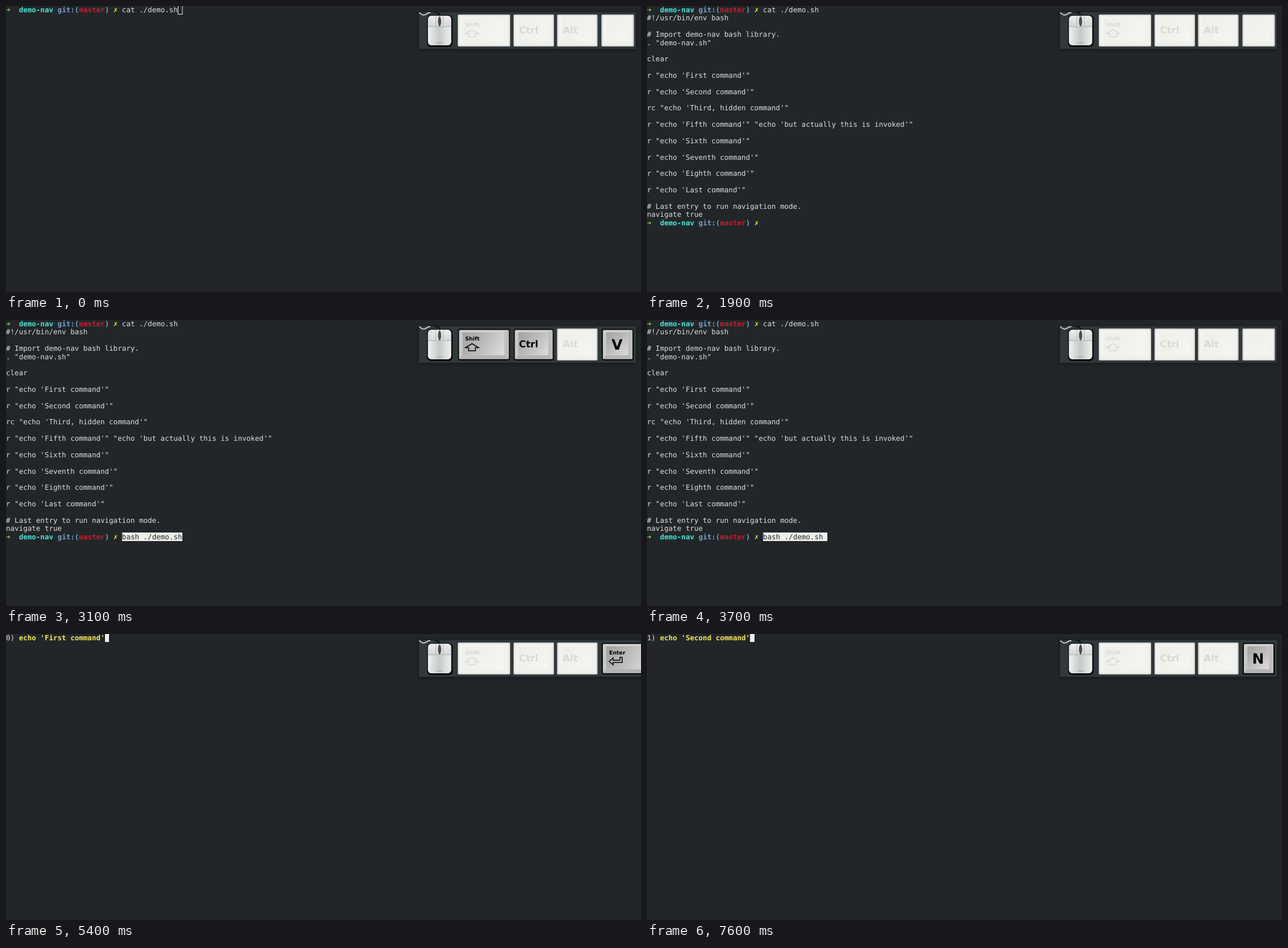
An HTML page with a canvas that plays this animation: 1116x502 px, repeating every 8000 ms.

```html
<!DOCTYPE html>
<html lang="en">
<head>
<meta charset="utf-8">
<title>Terminal demo</title>
<style>
  html, body { margin: 0; width: 100%; height: 100%; overflow: hidden; background: #222629; }
  canvas { display: block; }
</style>
</head>
<body>
<canvas id="stage" width="1116" height="502"></canvas>
<script>
const ctx = document.getElementById("stage").getContext("2d");
const LOOP = 8000, COL = 7.55, ROW = 14.365;
const MONO = '12.54px "DejaVu Sans Mono", "DejaVu Sans", monospace';
const SANS = '"DejaVu Sans", sans-serif';
const BG = "#222629", FG = "#dfe0dc", WHITE = "#eeeeec", YELLOW = "#f2e75c";

const SCRIPT = `#!/usr/bin/env bash

# Import demo-nav bash library.
. "demo-nav.sh"

clear

r "echo 'First command'"

r "echo 'Second command'"

rc "echo 'Third, hidden command'"

r "echo 'Fifth command'" "echo 'but actually this is invoked'"

r "echo 'Sixth command'"

r "echo 'Seventh command'"

r "echo 'Eighth command'"

r "echo 'Last command'"

# Last entry to run navigation mode.
navigate true`.split("\n");

// Each step overrides parts of the state before it.
const STEPS = [
  [0, { view: "typed", cursor: "hollow", click: false, mods: false, key: "" }],
  [400, { cursor: "block", click: true }],
  [600, { click: false }],
  [1000, { cursor: "" }],
  [1300, { view: "listing", cursor: "block", key: "Enter" }],
  [1900, { cursor: "", key: "" }],
  [2500, { cursor: "block", mods: true }],
  [3100, { view: "pasted", cursor: "", key: "V" }],
  [3600, { mods: false, key: "" }],
  [3700, { cursor: "block" }],
  [4300, { cursor: "" }],
  [4900, { cursor: "block" }],
  [5400, { view: "first", key: "Enter" }],
  [6000, { cursor: "", key: "" }],
  [6600, { cursor: "block" }],
  [7100, { cursor: "" }],
  [7600, { view: "second", cursor: "block", key: "N" }]
];

function stateAt(time) {
  return Object.assign({}, ...STEPS.filter(([start]) => start <= time).map(([, change]) => change));
}

function write(text, col, row, color = FG, bold = false) {
  ctx.font = (bold ? "bold " : "") + MONO;
  ctx.fillStyle = color;
  ctx.fillText(text, col * COL, 11.1 + row * ROW);
}

function cells(col, row, count) {
  const left = Math.round(col * COL), top = Math.round(row * ROW);
  ctx.fillStyle = WHITE;
  ctx.fillRect(left, top, Math.round((col + count) * COL) - left, Math.round((row + 1) * ROW) - top);
}

function prompt(row) {
  write("➜", 0, row, "#8ae234", true);
  write("demo-nav", 3, row, "#48e4d6", true);
  write("git:(", 12, row, "#729fcf", true);
  write("master", 17, row, "#c81c2c", true);
  write(")", 23, row, "#729fcf", true);
  write("✗", 25, row, "#f4e840", true);
}

function terminal({ view, cursor }) {
  let col = 40, row = 0;
  if (view === "first" || view === "second") {
    const command = view === "first" ? "echo 'First command'" : "echo 'Second command'";
    write(view === "first" ? "0)" : "1)", 0, 0);
    write(command, 3, 0, YELLOW, true);
    col = 3 + command.length;
  } else {
    prompt(0);
    write("cat ./demo.sh", 27, 0);
    if (view !== "typed") {
      SCRIPT.forEach((line, i) => write(line, 0, i + 1));
      row = SCRIPT.length + 1;
      col = 27;
      prompt(row);
    }
    if (view === "pasted") {
      const command = "bash ./demo.sh";
      cells(col, row, command.length);
      write(command, col, row, BG);
      col += command.length;
    }
  }
  if (cursor === "block") cells(col, row, 1);
  if (cursor === "hollow") {
    ctx.strokeStyle = WHITE;
    ctx.lineWidth = 1;
    ctx.strokeRect(302.5, -0.5, 7.5, 15);
  }
}

function gradient(x0, y0, x1, y1, ...colors) {
  const fill = ctx.createLinearGradient(x0, y0, x1, y1);
  colors.forEach((color, i) => fill.addColorStop(i / (colors.length - 1), color));
  return fill;
}

function rounded(x, y, w, h, r, fill) {
  ctx.beginPath();
  ctx.roundRect(x, y, w, h, r);
  ctx.fillStyle = fill;
  ctx.fill();
}

function polygon(points, fill, stroke) {
  ctx.beginPath();
  points.forEach(([x, y]) => ctx.lineTo(x, y));
  ctx.closePath();
  if (fill) { ctx.fillStyle = fill; ctx.fill(); }
  if (stroke) { ctx.strokeStyle = stroke; ctx.lineWidth = 1.5; ctx.stroke(); }
}

function label(text, x, y, size, align = "left") {
  ctx.font = `bold ${size}px ${SANS}`;
  ctx.textAlign = align;
  ctx.fillStyle = "#000";
  ctx.fillText(text, x, y);
  ctx.textAlign = "left";
}

function keycap(x, w, pressed, drawLabel) {
  const l = x + 2.5, r = x + w - 2.5, t = 17.5, b = 68.5;
  const fl = l + 6, fr = r - 8, ft = t + 4, fb = b - 7;
  rounded(x + 0.5, 15.5, w - 1, 55.5, 3, "#080808");
  rounded(l, t, r - l, b - t, 2, "#d2d2d2");
  polygon([[l, t], [fl, ft], [fl, fb], [l, b]], "#c9c9c9");
  polygon([[r, t], [fr, ft], [fr, fb], [r, b]], "#bebebe");
  polygon([[l, b], [fl, fb], [fr, fb], [r, b]], "#b4b4b4");
  rounded(fl, ft, fr - fl, fb - ft, 1, gradient(fl, ft, fr, fb, "#a2a2a2", "#bcbcbc", "#dedede"));
  drawLabel();
  if (!pressed) rounded(x, 15, w, 56, 2, "rgba(250,250,245,0.87)");
}

function shiftLabel() {
  label("Shift", 807, 35.5, 9.4);
  polygon([[819, 41.5], [830.5, 48.5], [825, 48.5], [825, 54], [813, 54], [813, 48.5], [807.5, 48.5]], null, "#000");
}

function enterLabel() {
  label("Enter", 1060, 35.5, 9.4);
  polygon([[1060, 48], [1067, 42], [1067, 46], [1079, 46], [1079, 41], [1083, 41], [1083, 50], [1067, 50], [1067, 54]], null, "#000");
}

function cord(color, width, start, ...curves) {
  ctx.beginPath();
  ctx.moveTo(...start);
  curves.forEach(curve => ctx.bezierCurveTo(...curve));
  ctx.strokeStyle = color;
  ctx.lineWidth = width;
  ctx.stroke();
}

function mouse(click) {
  cord("#0c0d0e", 2, [752, 11], [758, 11, 762, 12, 762, 17]);
  cord("#d4d6d6", 1.8, [726, 11], [731, 17, 735, 17, 739, 14], [741, 12, 743, 11.5, 746, 11.5]);
  rounded(740, 16, 45, 56, 7, "#070809");
  rounded(741.5, 17, 41, 52, 6, gradient(741, 0, 783, 0, "#f3f3f3", "#d9dbdb", "#c5c9ca", "#dcdede", "#eeeeee"));
  rounded(742, 17.5, 40, 18.5, [6, 6, 0, 0], gradient(0, 17, 0, 36, "#eeeeee", "#d3d5d6"));
  if (click) rounded(742, 17.5, 20, 18.5, [6, 0, 0, 0], gradient(0, 17, 0, 36, "#777777", "#333333"));
  ctx.fillStyle = "#aeb2b3";
  ctx.fillRect(742, 36, 40, 1);
  ctx.fillRect(755, 18, 1, 18);
  ctx.fillRect(768, 18, 1, 18);
  ctx.fillRect(756.5, 64, 11, 2);
  ctx.beginPath();
  ctx.ellipse(762, 27, 2.6, 9, 0, 0, Math.PI * 2);
  ctx.fillStyle = gradient(759, 0, 765, 0, "#202426", "#555b5e", "#202426");
  ctx.fill();
}

function overlay({ click, mods, key }) {
  const wide = key === "Enter";
  ctx.save();
  ctx.shadowColor = "rgba(0,0,0,0.4)";
  ctx.shadowBlur = 8;
  ctx.shadowOffsetY = 2;
  ctx.fillStyle = "#30383b";
  ctx.fillRect(726, 11, wide ? 417 : 381, 64);
  ctx.restore();

  ctx.save();
  ctx.beginPath();
  ctx.rect(726, 11, 390, 64);
  ctx.clip();
  mouse(click);
  keycap(794, 92, mods, shiftLabel);
  keycap(892, 71, mods, () => label("Ctrl", 901.5, 48, 16.6));
  keycap(968.5, 71, false, () => label("Alt", 978.5, 48, 16.6));
  keycap(1046.5, wide ? 92 : 57, key !== "", wide ? enterLabel : () => label(key, 1074, 52, 25, "center"));
  ctx.restore();
}

function frame() {
  const state = stateAt(performance.now() % LOOP);
  ctx.textRendering = "geometricPrecision";
  ctx.fillStyle = BG;
  ctx.fillRect(0, 0, 1116, 502);
  terminal(state);
  overlay(state);
  requestAnimationFrame(frame);
}
frame();
</script>
</body>
</html>
```
